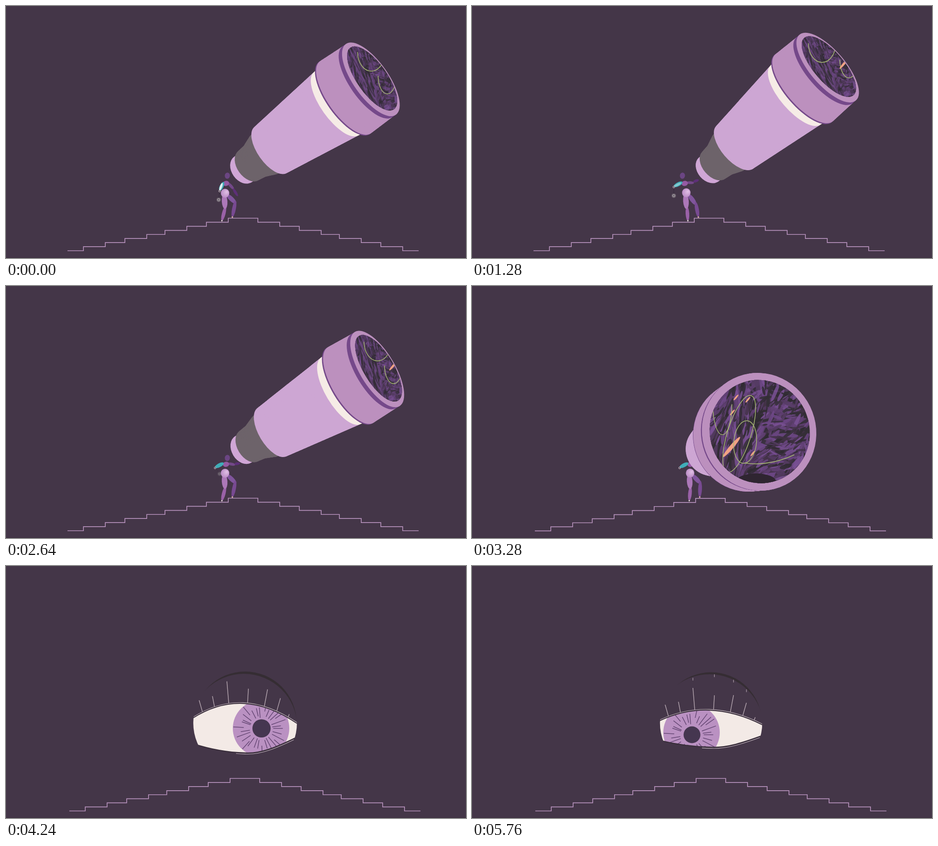
An HTML page with a canvas for the animation above (5840 ms loop, 1010 px wide and 554 px high).

```html
<!DOCTYPE html>
<html lang="en">
<head>
<meta charset="utf-8">
<title>Telescope</title>
<style>
html, body { margin: 0; width: 100%; height: 100%; overflow: hidden; background: #443648; }
canvas { display: block; }
</style>
</head>
<body>
<canvas id="stage" width="1010" height="554"></canvas>
<script>
const ctx = document.getElementById('stage').getContext('2d');
const LOOP = 5840, STEP = 80, TAU = Math.PI * 2;
const BG = '#443648', DARK = '#352d33';

const lerp = (a, b, f) => a + (b - a) * f;
const ramp = (t, a, b) => Math.max(0, Math.min(1, (t - a) / (b - a)));
const ease = (t, a, b) => {
  const f = ramp(t, a, b);
  return f * f * (3 - 2 * f);
};
// The walker leans back once and returns, then steps slightly back
const lean = t => Math.sin(Math.PI * ramp(t, 0, 2640)) ** 2 + 0.2 * ease(t, 2640, 3280);

function random(seed) {
  return () => (seed = (seed * 16807) % 2147483647) / 2147483647;
}

function ellipse(x, y, rx, ry, rot, fill) {
  ctx.beginPath();
  ctx.ellipse(x, y, rx, ry, rot, 0, TAU);
  ctx.fillStyle = fill;
  ctx.fill();
}
const circle = (x, y, r, fill) => ellipse(x, y, r, r, 0, fill);

function limb(x1, y1, x2, y2, w, fill) {
  ellipse((x1 + x2) / 2, (y1 + y2) / 2, Math.hypot(x2 - x1, y2 - y1) / 2, w,
    Math.atan2(y2 - y1, x2 - x1), fill);
}

function line(x1, y1, x2, y2, color, w) {
  ctx.beginPath();
  ctx.moveTo(x1, y1);
  ctx.lineTo(x2, y2);
  ctx.strokeStyle = color;
  ctx.lineWidth = w;
  ctx.stroke();
}

function stairs(shift) {
  let x = 135 + shift, y = 538 + shift / 8;
  ctx.beginPath();
  ctx.moveTo(x, y);
  for (let i = 0; i <= 16; i++) {
    const k = Math.min(i, 16 - i);
    const tread = k == 8 ? 65 : k % 2 ? 48 : k == 0 ? 35 : k == 4 ? 40 : 43;
    if (i) ctx.lineTo(x, y += i < 9 ? -8.94 : 8.94);
    ctx.lineTo(x += tread, y);
  }
  ctx.strokeStyle = '#b792bd';
  ctx.lineWidth = 1.7;
  ctx.stroke();
}

// ---- walker ----
function walker(t, shift) {
  const seen = 1 - ramp(t, 3440, 3760);
  if (!seen) return;
  const w = lean(t), raise = ease(t, 0, 1280), late = ease(t, 1280, 2640);
  const hx = 481 - 10.5 * w, hy = 411.5 - w;
  const cx = 483 - 16 * w, cy = 390 + 2 * late;
  const lx = cx - 14 - 10 * raise, ly = cy + 16 - 9 * raise;
  const rx = cx + 26 + 5 * raise, ry = cy + 28 - 36 * raise + 6 * late;
  const ex = lerp(cx, rx, 0.63), ey = lerp(cy, ry, 0.4) + 1;
  const fx = 505 - 13 * w, fy = 432 + 3 * w;
  const bx = 482 - 10 * w;
  ctx.save();

  ctx.globalAlpha = seen * (1 - 0.6 * ramp(t, 2000, 2640)) * (1 - ramp(t, 2640, 2960));
  const px = lx - 2 + 2 * raise + 10 * late, py = ly + 20 - 6 * late;
  line(lx, ly, px, py, '#322838', 0.8);
  circle(px, py, 4.8, '#6f6670');
  circle(px, py, 2.8, '#a79fa6');
  circle(px, py, 1.3, '#453a48');
  ctx.globalAlpha = seen;

  limb(hx + 4, hy + 3, fx, fy + 2, 5, '#80559c');
  limb(fx - 1, fy - 4, 497 + shift, 464, 4.2, '#784a92');
  circle(497 + shift, 464, 1.6, '#f2c3b4');
  limb(bx, 441, 474 + shift, 472, 4, '#9a61a8');
  limb(hx - 2, hy + 2, bx - 1, 446, 6.2, '#ac78b8');
  circle(474 + shift, 472, 1.5, '#f6ece6');

  limb(cx + 4, cy - 2, ex + 1, ey + 1, 3.2, '#734889');
  limb(ex - 1, ey - 1, rx, ry, 3, '#5d2f78');
  ellipse(cx, cy, 7, 5.6, -0.15, '#955aa3');

  const skin = ctx.createRadialGradient(hx + 4, hy - 3, 1, hx, hy, 11);
  skin.addColorStop(0, '#dfbde3');
  skin.addColorStop(1, '#b686c2');
  ellipse(hx, hy, 9.3, 9.8, 0, skin);

  limb(cx - 5, cy - 3, lx, ly, 4.3, '#3fadb8');
  ctx.globalAlpha = seen * 0.9 * (1 - ramp(t, 0, 2200));
  limb(cx - 8, cy - 1, lx, ly, 2.6, '#f2f5f4');
  ctx.globalAlpha = seen;
  circle(lx, ly + 1, 2.4, '#d9ccd3');
  circle(lx, ly + 1, 1.4, BG);

  ellipse(486 - 24 * w, 373 + 5 * late, 5.6, 6.8, 0.1, '#6b4583');
  ctx.restore();
}

// ---- telescope ----
// colour, then distance along the axis and radius at both ends
const TUBE = [
  ['#d0a6d6', 3, 34, 5, 34],
  ['#6d636a', 18, 39, 38, 42],
  ['#6d636a', 38, 42, 62, 52],
  ['#cda6d3', 78, 62, 254, 85],
  ['#f6ece6', 254, 85, 275, 88],
  ['#75498a', 275, 97, 278, 97],
  ['#bc90be', 278, 97, 337, 95],
  ['#75498a', 337, 95, 346, 95],
  ['#bc90be', 346, 95, 347, 95]
];

const rnd = random(4711);
const SHADES = ['#6d4785', '#553b63', '#332e35', '#614074', '#302b32', '#7a5094', '#423247'];
const STROKES = Array.from({ length: 620 }, (_, i) => {
  const x = rnd() * 2 - 1, y = rnd() * 2 - 1, fine = i / 620;
  return {
    x, y,
    len: lerp(0.26, 0.06, fine) * (0.6 + rnd()),
    w: lerp(0.1, 0.012, Math.sqrt(fine)) * (0.5 + rnd()),
    rot: -0.55 + Math.sin(x * 3 + y * 2) * 0.6 + (rnd() - 0.5) * (x < 0.1 ? 0.5 : 1.8),
    color: SHADES[i % SHADES.length]
  };
});

function arc(x, y, rx, ry, rot = 0, to = Math.PI) {
  ctx.beginPath();
  ctx.ellipse(x, y, rx, ry, rot, 0, to);
  ctx.stroke();
}

function ember(x, y, size) {
  limb(x + size * 0.65, y - size * 0.76, x - size * 0.65, y + size * 0.76, 1 + size / 9, '#f0a284');
}

function lens(t, x, y, rx, ry, rot, turn) {
  const w = lean(t);
  ctx.save();
  ctx.beginPath();
  ctx.ellipse(x, y, rx, ry, rot, 0, TAU);
  ctx.fillStyle = '#332e35';
  ctx.fill();
  ctx.clip();

  ctx.save();
  ctx.translate(x, y);
  ctx.rotate(rot);
  ctx.scale(rx, ry);
  ctx.globalAlpha = lerp(0.6, 0.85, turn);
  for (const s of STROKES) ellipse(s.x, s.y, s.len, s.w, s.rot, s.color);
  ctx.restore();

  ctx.translate(x, y);
  ctx.strokeStyle = '#a8bb72';
  ctx.lineWidth = 1.5;

  // hanging threads seen from the side
  ctx.globalAlpha = 1 - turn;
  arc(-2 - 13 * w, -58 + 7 * w, 30, 42);
  arc(33 + 11 * w, -6 - 9 * w, 20, 40);
  ctx.globalAlpha = ramp(t, 640, 1280);
  ember(lerp(32, -62, turn), lerp(-5, 34, turn), lerp(13, 29, turn));

  // loops seen from the front
  ctx.globalAlpha = turn;
  for (const [ex, ey] of [[-52, -75], [-26, -70], [-60, -42], [-15, 48]]) ember(ex, ey, 8);
  ellipse(-8, 110, 44, 18, 0, '#2f2531');
  arc(-82, -60, 21, 67);
  arc(-45, 5, 88, 26, -1.27, TAU);
  arc(-32, 23, 25, 47, 0.1, TAU);
  ctx.beginPath();
  ctx.moveTo(-34, 69);
  ctx.quadraticCurveTo(20, 77, 76, 51);
  ctx.stroke();
  ctx.restore();
}

function tilt(t) {
  if (t < 1160) return lerp(-35.2, -41, ease(t, 0, 1160));
  return lerp(-41, -30.3, ease(t, 1160, 2240)) - 0.7 * ease(t, 2240, 2640);
}

function telescope(t) {
  if (t >= 4160) return;
  const turn = ease(t, 2640, 3280), face = ease(t, 3280, 3920), fade = ramp(t, 3920, 4160);
  const px = 518 - 24 * turn + 31 * face;
  const py = 361 + 10.5 * turn - 26.5 * face - 28 * Math.sin(Math.PI * face);
  const rot = lerp(lerp(tilt(t), -20.5, turn), 0, face) * Math.PI / 180;
  const length = lerp(lerp(1, 0.42, turn), 0, face);
  const size = 1 - 0.08 * face - 0.053 * fade;

  const disc = (u, radius) => {
    const near = u < 78 ? 0.3 + 0.008 * u : 0.8 + 0.00164 * u;
    const round = lerp(0.4 + 0.36 * Math.exp(-u / 50), lerp(0.96, 1, face), turn);
    const r = radius * lerp(1, near, turn) * size;
    return [px + Math.cos(rot) * u * length, py + Math.sin(rot) * u * length, r * round, r, rot];
  };
  for (const [color, u0, r0, u1, r1] of TUBE) {
    const n = Math.ceil((u1 - u0) / 2);
    for (let i = 0; i <= n; i++) ellipse(...disc(lerp(u0, u1, i / n), lerp(r0, r1, i / n)), color);
  }
  lens(t, ...disc(350, 83), turn);
}

// ---- eye ----
const LID = [400, 341, 480, 285, 560, 290, 645, 350];
const UPPER = `M400 341C${LID.slice(2)}`;
const LOWER = 'C595 398 560 413 525 411C490 410 450 405 400 387';
// place along the lid and length
const LASHES = [[0.13, 25], [0.24, 23], [0.37, 48], [0.54, 31], [0.69, 37], [0.8, 28], [0.9, 6]];

const ray = random(97);
const RAYS = Array.from({ length: 30 }, (_, i) => {
  const edge = i % 4 == 3;
  return {
    a: (i + ray() * 0.6) / 30 * TAU,
    from: edge ? 38 : 23 + ray() * 5,
    to: edge ? 61 : 43 + ray() * 16
  };
});

function lidPoint(s) {
  const q = 1 - s, k = [q * q * q, 3 * q * q * s, 3 * q * s * s, s * s * s];
  return [0, 1].map(d => k.reduce((sum, v, i) => sum + v * LID[2 * i + d], 0));
}

function lashes(cx, cy, open, folds) {
  LASHES.forEach(([s, len], i) => {
    const [x, lidY] = lidPoint(s), y = 359 + (lidY - 361) * open;
    const tip = x + len * (x - 513) * 0.0035;
    line(x, y, tip, y - len, '#b3a4ae', 1.5);
    if (folds && i > 1 && i < 6) {
      const top = cy - Math.sqrt(107 ** 2 - (tip - cx) ** 2);
      line(tip, top, tip, top + 6, '#a394a0', 1.4);
    }
  });
}

function eye(t) {
  const seen = ramp(t, 3760, 4080);
  if (!seen) return;
  const cx = 525, cy = 345, settle = ramp(t, 4240, 4560);
  const r = lerp(113, 111.5, settle), drop = lerp(9.6, 12.3, settle);
  const right = ease(t, 3920, 4240), left = ease(t, 4480, 4960), blink = ease(t, 5600, 5760);
  const open = 0.02 + 0.98 * right - 0.25 * blink;
  const ix = 525 + 35 * right - 83 * left + 5 * blink;
  const iy = 360 - 3 * right + 9 * left, py = iy + 4 * left + blink;

  ctx.save();
  ctx.globalAlpha = seen;
  circle(cx, cy, r, DARK);
  ctx.save();
  ctx.beginPath();
  ctx.arc(cx, cy, r + 0.8, 0, TAU);
  ctx.clip();
  circle(cx - 0.29 * drop, cy + 0.956 * drop, r + lerp(4.2, 7.3, settle), BG);

  if (t >= 3920) {
    const fit = d => {
      const path = new Path2D();
      path.addPath(new Path2D(d), new DOMMatrix([1, 0, 0, open, 0, 361 * (1 - open)]));
      return path;
    };
    const shape = fit(UPPER + 'L645 373' + LOWER + 'Z');
    const top = fit(UPPER), bottom = fit('M645 373' + LOWER);
    ctx.save();
    ctx.clip(shape);
    ctx.fillStyle = '#f3eae6';
    ctx.fill(shape);
    circle(ix, iy, 62, '#ba91c2');
    for (const { a, from, to } of RAYS) {
      const c = Math.cos(a), s = Math.sin(a);
      line(ix + c * from, py + s * from, ix + c * to, py + s * to, '#644673', 1.5);
    }
    circle(ix + 1, py, lerp(14, 20, open), '#453650');
    ctx.restore();

    ctx.strokeStyle = '#3a2f3c';
    ctx.lineWidth = 2.4;
    ctx.stroke(top);
    ctx.stroke(bottom);
    ctx.strokeStyle = '#bfb1ba';
    ctx.lineWidth = 1.1;
    ctx.translate(0, -1.6);
    ctx.stroke(top);
    ctx.translate(0, 4);
    ctx.beginPath();
    ctx.rect(505, 330, 127, 100);
    ctx.clip();
    ctx.stroke(bottom);
  }
  ctx.restore();
  if (t >= 3920) lashes(cx, cy, open, blink > 0.5);
  ctx.restore();
}

function draw(now) {
  const t = Math.floor(now % LOOP / STEP) * STEP;
  const shift = 3 * ramp(t, 2640, 3280) + ramp(t, 3280, 3520);
  ctx.fillStyle = BG;
  ctx.fillRect(0, 0, 1010, 554);
  ctx.fillStyle = '#3d2f3f';
  ctx.fillRect(0, 552.5, 1010, 1.5);
  stairs(shift);
  if (t < 2960) {
    telescope(t);
    walker(t, shift);
  } else {
    walker(t, shift);
    telescope(t);
  }
  eye(t);
}

const start = performance.now();
function frame() {
  draw(performance.now() - start);
  requestAnimationFrame(frame);
}
frame();
</script>
</body>
</html>
```
